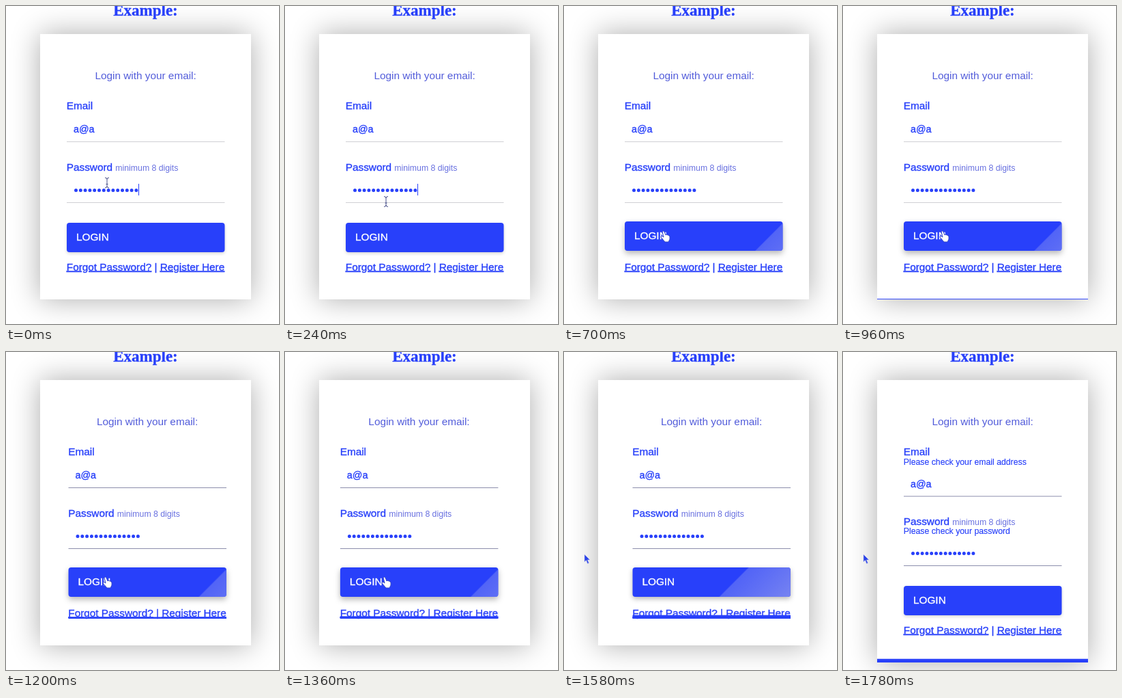
An HTML page that plays this animation: 400x465 px, repeating every 1800 ms.

```html
<!DOCTYPE html>
<html lang="en">
<head>
<meta charset="utf-8">
<title>Login form</title>
<style>
  html, body { margin: 0; width: 100%; height: 100%; overflow: hidden; background: #fff; }
  #card { position: absolute; left: 50px; top: 41px; width: 309px; height: 388px;
    background: #fff; box-shadow: 0 0 40px rgba(0, 0, 0, .33); }
  svg { position: absolute; left: 0; top: 0; }
  text { font: 15.33px "Liberation Sans", Arial, sans-serif; fill: #2840fa; stroke: #2840fa; stroke-width: .35; }
  .title { font: bold 23px "Liberation Serif", Times, serif; }
  .soft { fill: #525cda; stroke: none; }
  .input { font-size: 14.4px; }
  .small { font-size: 12.27px; stroke-width: .15; }
  .hint { font-size: 12.27px; fill: #6870e0; stroke: none; }
  .login { fill: #fff; stroke: #fff; }
  .link { text-decoration: underline; }
</style>
</head>
<body>
<div id="card"></div>
<svg width="400" height="465" viewBox="0 0 400 465">
  <defs>
    <linearGradient id="sheen" gradientUnits="userSpaceOnUse" x1="0" y1="360" x2="60" y2="420">
      <stop offset="0" stop-color="#6e7cf4" stop-opacity="0"/>
      <stop offset=".02" stop-color="#6e7cf4" stop-opacity=".6"/>
      <stop offset="1" stop-color="#7c88f0"/>
    </linearGradient>
  </defs>
  <text class="title" x="204.5" y="14" text-anchor="middle">Example:</text>
  <g id="form">
    <text class="soft" x="130.5" y="106.5">Login with your email:</text>
    <text x="88.8" y="151">Email</text>
    <text class="small error" x="88.8" y="164.5">Please check your email address</text>
    <g class="drop1">
      <text class="input" x="99" y="185">a@a</text>
      <path class="line" d="M89 198.5H320.5"/>
      <text x="88.8" y="240.5">Password <tspan class="hint">minimum 8 digits</tspan></text>
      <text class="small error" x="88.8" y="253.8">Please check your password</text>
    </g>
    <g class="drop2">
      <path d="M102.500 269.5H192" stroke="#2840fa" stroke-width="5" stroke-linecap="round" stroke-dasharray="0 6.8"/>
      <path id="caret" d="M194.5 260V277" stroke="#2840fa"/>
      <path class="line" d="M89 287.5H320.5"/>
      <g id="button">
        <rect id="face" x="89" y="317" width="231.5" height="43" rx="4" fill="#2840fa"/>
        <rect id="shine" x="89" y="317" width="231.5" height="43" rx="4" fill="url(#sheen)"/>
        <text class="login" x="103" y="342.5">LOGIN</text>
      </g>
      <text x="88.8" y="386.5"><tspan class="link">Forgot Password?</tspan> | <tspan class="link">Register Here</tspan></text>
    </g>
  </g>
  <rect id="bar" fill="#2840fa"/>
  <path id="beam" d="M-3-7.500Q0-7.500 0-5Q0-7.500 3-7.500M0-5V5M-3 7.500Q0 7.500 0 5Q0 7.500 3 7.500M-1.500 2H1.500" fill="none" stroke="#4b528c"/>
  <path id="hand" d="M-4-7Q-2.500-9-1-7L1-2 2-3 4-2 5-2 7 0 7 4 5 8H0L-6 1Q-6-1-4-0.500L-2 1Z" fill="#fff" stroke="#3345c8"/>
  <path id="arrow" d="M0 0V11L2.500 8.500 4.500 13.500 6.500 12.500 4.500 8H8Z" fill="#2a42e8" stroke="#c8ccec" stroke-width=".6"/>
</svg>
<script>
const LOOP = 1800, SHAKE_START = 1100, SHAKE_END = 1660;
const $ = id => document.getElementById(id);
const all = (sel, fn) => document.querySelectorAll(sel).forEach(fn);
const ramp = (t, a, b) => Math.min(1, Math.max(0, (t - a) / (b - a)));
const ease = k => (1 - Math.cos(Math.PI * k)) / 2;
const move = (el, x, y) => el.setAttribute('transform', `translate(${x} ${y})`);
const show = (el, on) => el.setAttribute('visibility', on ? 'visible' : 'hidden');

const shakeKeys = [[SHAKE_START, 0], [1190, 2.6], [1370, -8.2], [1580, 11.5], [SHAKE_END, 0]];
function shake(t) {
  let x = 0;
  shakeKeys.slice(1).forEach(([t1, x1], i) => {
    const [t0, x0] = shakeKeys[i];
    if (t >= t0 && t < t1) x = x0 + (x1 - x0) * ease(ramp(t, t0, t1));
  });
  return x;
}

function drawPointer(t) {
  const away = ease(ramp(t, 1400, 1570));
  const x = 148 - 118 * away;
  const y = 258.5 + 78.5 * ease(ramp(t, 120, 420)) - 41 * away;
  const kind = x < 89 ? 'arrow' : y < 288 && !away ? 'beam' : y < 315 ? 'arrow' : 'hand';
  for (const id of ['beam', 'hand', 'arrow']) {
    show($(id), id === kind);
    move($(id), x, y);
  }
}

function drawButton(t) {
  const hover = ramp(t, 340, 510) - ramp(t, 1540, 1620);
  const lift = ramp(t, 340, 580) - ramp(t, 1580, 1640);
  move($('button'), 0, -2 * lift);
  $('face').style.filter =
    `drop-shadow(0 ${2 + 2 * lift}px ${2 + 2 * lift}px rgba(0,0,0,${.16 + .12 * lift}))`;
  $('shine').setAttribute('opacity', Math.min(1, 3 * hover));
  $('sheen').setAttribute('gradientTransform', `translate(${279 - 125 * (1 - hover)} 0)`);
}

// While the form shakes, the bar is anchored to the form instead of the card.
function drawBar(t, x, failed) {
  const shaking = t >= SHAKE_START && !failed;
  const h = 5.3 * ramp(t, 800, 1580) ** 1.1;
  const bottom = shaking ? 390 : failed ? 454 : 429;
  const box = { x: shaking ? 89 + x : 50, y: bottom - h, width: shaking ? 231.5 : 309, height: h };
  for (const k in box) $('bar').setAttribute(k, box[k]);
}

function draw(t) {
  const failed = t >= SHAKE_END, x = shake(t);
  const grow = failed ? 12.5 : 0;
  $('card').style.height = 388 + 2 * grow + 'px';
  move($('form'), x, 0);
  all('.drop1', el => move(el, 0, grow));
  all('.drop2', el => move(el, 0, 2 * grow));
  all('.error', el => show(el, failed));
  const k = ramp(t, 980, 1180), mix = (a, b) => a + (b - a) * k;
  all('.line', el => el.setAttribute('stroke', `rgb(${mix(208, 140)},${mix(208, 142)},${mix(212, 172)})`));
  show($('caret'), t < 400);
  drawButton(t);
  drawBar(t, x, failed);
  drawPointer(t);
}

const start = performance.now();
function tick() {
  draw((performance.now() - start) % LOOP);
  requestAnimationFrame(tick);
}
tick();
</script>
</body>
</html>
```
